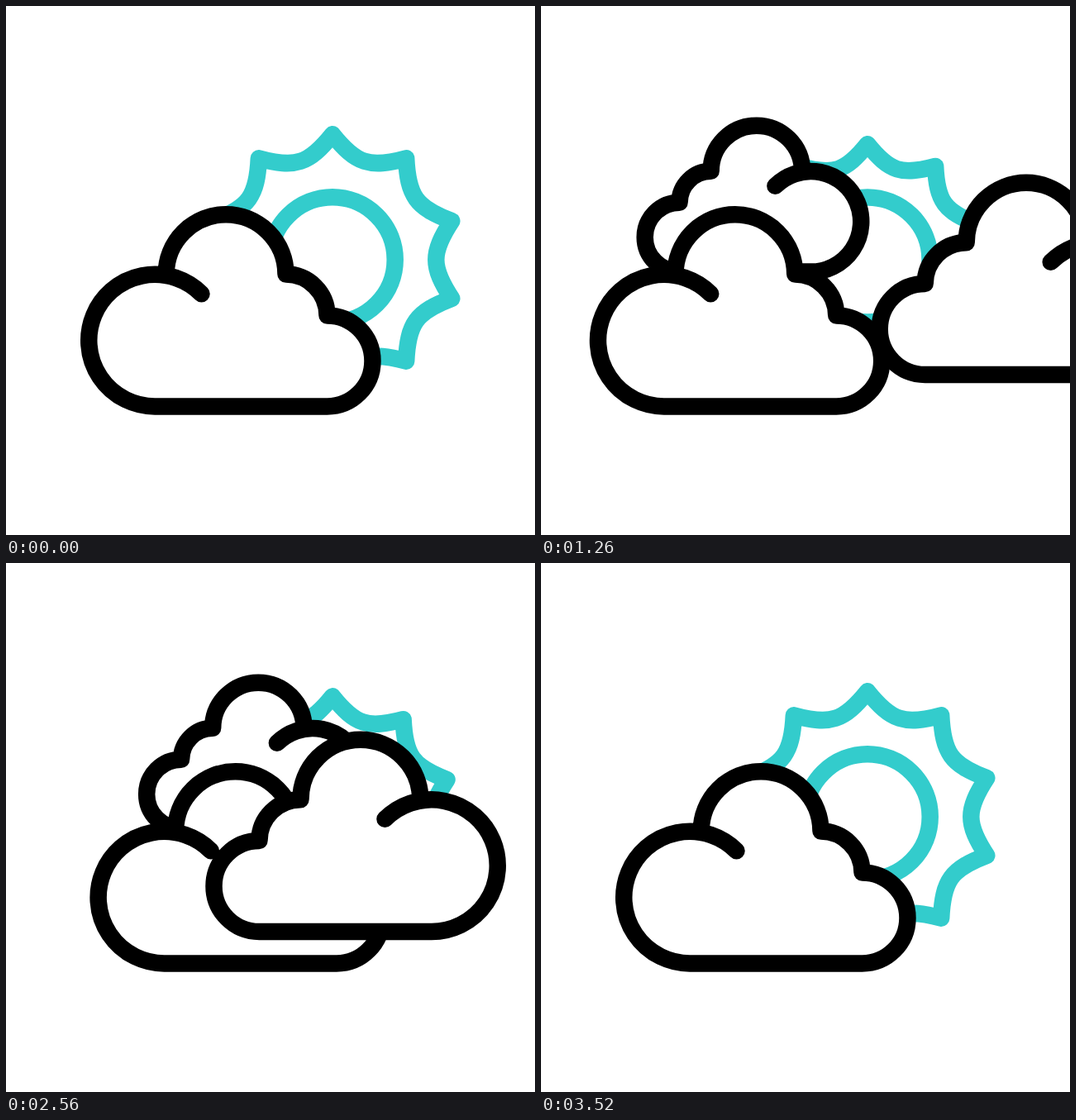
Recreate the animation shown at these times as an HTML page. Size 640x640 px, loop 3.6 s.

```html
<!DOCTYPE html>
<html lang="en">
<head>
<meta charset="utf-8">
<title>Sun and clouds</title>
<style>
  html, body { margin: 0; width: 100%; height: 100%; overflow: hidden; background: #fff; }
  svg { display: block; width: 100vw; height: 100vh; }
  .line {
    fill: #fff; stroke: #000; stroke-width: 20.5;
    stroke-linecap: round; stroke-linejoin: round;
    vector-effect: non-scaling-stroke;
  }
  .sun { stroke: #3cc; }
</style>
</head>
<body>
<svg viewBox="0 0 640 640">
  <defs>
    <path id="cloud" class="line" d="M236.5 348.2 A79.8 79.8 0 1 0 180.1 484.4 H388.5 A55 55 0 0 0 388.5 374.4
      A50 50 0 0 0 338.5 324.6 A72.4 72.4 0 0 0 193.7 324.6"/>
  </defs>
  <path id="rays" class="line sun"/>
  <circle id="disc" class="line sun" cx="395" cy="307"/>
  <use id="back" href="#cloud"/>
  <use id="front" href="#cloud"/>
  <use id="right" href="#cloud"/>
</svg>
<script>
const LOOP = 3600, START = 200, END = 3520;
const CX = 395, CY = 307, TIPS = 10, TIP_R = 151.7, DISC_R = 75.7;
const $ = id => document.getElementById(id);

// Two even swings between high and low, from rest and back to rest
function pulse(high, low) {
  const swings = [high, low, high, low].map((v, i) => [800 + 690 * i, v]);
  return [[START, 1], ...swings, [END, 1]];
}

const rays = pulse(1.096, 0.861);
const disc = pulse(1.117, 0.957);

// Cloud positions: a few [time, x] turning points each
const front = [[397, 0], [1060, -43], [1660, 7], [2120, 15.4], [3440, 0]];
const back = [[740, -290], [1260, 115.5], [1560, 173], [2200, 149.5], [2920, 171], [END, -290]];
const right = [[START, 848], [1260, 400], [1660, 289], [2160, 256.5], [2840, 237], [END, 810]];

const slope = (a, b) => (b[1] - a[1]) / (b[0] - a[0]);

// Flat at turning points and ends, smooth elsewhere
function tangent(k, i) {
  if (i === 0 || i === k.length - 1) return 0;
  const a = slope(k[i - 1], k[i]), b = slope(k[i], k[i + 1]);
  return a * b > 0 ? 2 * a * b / (a + b) : 0;
}

function at(k, t) {
  const n = k.length - 1;
  if (t <= k[0][0]) return k[0][1];
  if (t >= k[n][0]) return k[n][1];
  let i = 0;
  while (t > k[i + 1][0]) i++;
  const [t0, v0] = k[i], [t1, v1] = k[i + 1];
  const d = t1 - t0, p = (t - t0) / d, q = 1 - p;
  return v0 + (v1 - v0) * p * p * (3 - 2 * p)
    + d * p * q * (q * tangent(k, i) - p * tangent(k, i + 1));
}

function raysPath(r) {
  const tip = i => {
    const a = i * 2 * Math.PI / TIPS;
    return [r * Math.sin(a), -r * Math.cos(a)];
  };
  const fmt = p => p.map(v => v.toFixed(3)).join(' ');
  let d = 'M' + fmt(tip(0));
  for (let i = 0; i < TIPS; i++) {
    const a = tip(i), b = tip(i + 1);
    const dx = b[0] - a[0], dy = b[1] - a[1];
    const bend = f => [a[0] + dx * f - dy * 0.27, a[1] + dy * f + dx * 0.27];
    d += 'C' + [bend(0.41), bend(0.59), b].map(fmt).join(' ');
  }
  return d + 'Z';
}

const place = (id, x, y, sx, sy) =>
  $(id).setAttribute('transform', `translate(${x} ${y}) scale(${sx} ${sy})`);

function draw(now) {
  const t = now % LOOP;
  const s = at(rays, t);
  place('rays', CX, CY, s, s);
  $('disc').setAttribute('r', DISC_R * at(disc, t));
  place('front', at(front, t), 0, 1, 1);
  place('back', at(back, t) + 347.8, -47.5, -0.762, 0.762);
  place('right', at(right, t) + 453.5, -38.4, -1, 1);
  requestAnimationFrame(draw);
}

$('rays').setAttribute('d', raysPath(TIP_R));
draw(performance.now());
</script>
</body>
</html>
```
